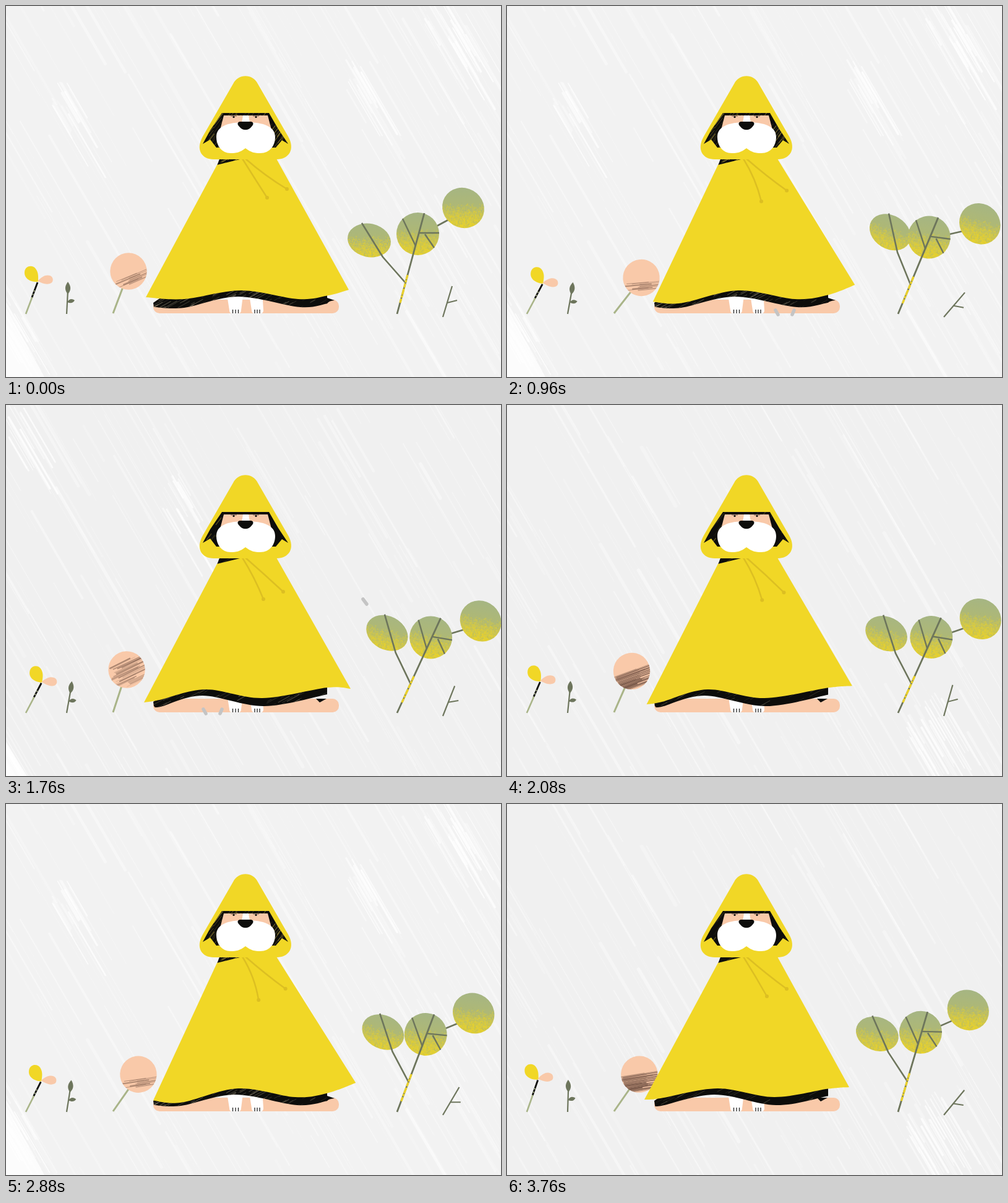
Animation of 800x600 px, one loop 3840 ms. Source, as an HTML page with a canvas:

```html
<!DOCTYPE html>
<html lang="en">
<head>
<meta charset="utf-8">
<title>Dog in the rain</title>
<style>
html, body { margin: 0; width: 800px; height: 600px; overflow: hidden; background: #f1f1f1; }
canvas { display: block; }
</style>
</head>
<body>
<canvas id="stage" width="800" height="600"></canvas>
<script>
const ctx = document.getElementById('stage').getContext('2d');
const STEP = 80, COUNT = 48, RAD = Math.PI / 180;
const YELLOW = '#f1d726', PINK = '#f9c9a9', OLIVE = '#6d755c', MOSS = '#a9b488', BLACK = '#0d0d0b';

// Pose keys share these step numbers; the loop closes at COUNT.
const KEYS = [0, 8, 16, 22, 31, 41, 47];
const pose = {
  tree:   [0, 7.7, 6.7, 9.6, 7.7, 3.5, 1.3],
  leaf:   [0, 15.5, 20.4, 15.7, 12.7, 13.7, 8.1],
  crown:  [0, 14.9, 13.9, 11.7, 6.8, 5.7, 4.9],
  flower: [0, 9, 4.6, 7.1, -1.3, 12.7, -1.3],
  ball:   [0, 19.8, 10.2, -2.5, 12.4, 14.1, 14.1],
  twig:   [0, 34.3, 8.3, 4.9, -3.2, 31.3, 22.8],
  wave:   [380, 367, 374, 322, 342, 398, 340],
  dip:    [474, 480, 480, 477, 484, 480, 476],
  lx:     [226, 233, 236, 223, 232, 240, 222],
  ly:     [471, 479, 477, 481, 486, 473, 478],
  rx:     [554, 560, 563, 557, 561, 567, 553],
  ry:     [459, 452, 452, 459, 448, 456, 458],
  cord1x: [422, 408, 416, 416, 408, 411, 420],
  cord1y: [310, 317, 314, 314, 317, 316, 311],
  cord2x: [454, 447, 457, 448, 449, 454, 452],
  cord2y: [296, 305, 292, 302, 302, 296, 299]
};

// Periodic Hermite interpolation through the pose keys.
function at(list, n) {
  const size = KEYS.length;
  const time = j => KEYS[(j + size) % size] + COUNT * Math.floor(j / size);
  const val = j => list[(j + size) % size];
  const slope = j => (val(j + 1) - val(j - 1)) / (time(j + 1) - time(j - 1));
  let i = size - 1;
  while (KEYS[i] > n) i--;
  const h = time(i + 1) - time(i), u = (n - time(i)) / h, v = 1 - u;
  return val(i) * (1 + 2 * u) * v * v + slope(i) * h * u * v * v +
    val(i + 1) * (3 - 2 * u) * u * u - slope(i + 1) * h * u * u * v;
}

function random(seed) {
  return () => {
    seed = (seed * 1664525 + 1013904223) >>> 0;
    return seed / 4294967296;
  };
}

function layer(w, h, draw) {
  const c = document.createElement('canvas');
  c.width = w;
  c.height = h;
  draw(c.getContext('2d'));
  return c;
}

function line(c, color, width, ...p) {
  c.strokeStyle = color;
  c.lineWidth = width;
  c.beginPath();
  c.moveTo(p[0], p[1]);
  for (let i = 2; i < p.length; i += 2) c.lineTo(p[i], p[i + 1]);
  c.stroke();
}

function shape(color, path) {
  ctx.fillStyle = color;
  ctx.fill(path instanceof Path2D ? path : new Path2D(path));
}

function ellipse(x, y, rx, ry = rx, tilt = 0) {
  const p = new Path2D();
  p.ellipse(x, y, rx, ry, tilt * RAD, 0, 7);
  return p;
}

function turn(x, y, deg, draw) {
  ctx.save();
  ctx.translate(x, y);
  ctx.rotate(deg * RAD);
  ctx.translate(-x, -y);
  draw();
  ctx.restore();
}

function clipped(path, draw) {
  ctx.save();
  ctx.clip(path);
  draw();
  ctx.restore();
}

// Catmull-Rom curve; the path is already at the first point.
function curve(path, pts) {
  for (let i = 0; i < pts.length - 1; i++) {
    const a = pts[Math.max(i - 1, 0)], b = pts[i], c = pts[i + 1], d = pts[Math.min(i + 2, pts.length - 1)];
    path.bezierCurveTo(b[0] + (c[0] - a[0]) / 6, b[1] + (c[1] - a[1]) / 6,
      c[0] - (d[0] - b[0]) / 6, c[1] - (d[1] - b[1]) / 6, c[0], c[1]);
  }
}

// Three rain sheets and three fur textures take turns.
const bright = [
  [[-15, 455], [15, 500], [690, -10], [730, 30], [90, 140], [560, 100]],
  [[-30, 510], [-20, 540], [15, 20], [265, 130]],
  [[690, 480], [660, 520]]
];
const rain = [0, 1, 2].map(m => layer(800, 600, c => {
  const r = random(71 + m * 977);
  const streak = (x, y, len, w, alpha) =>
    line(c, `rgba(255,255,255,${alpha})`, w, x, y, x + len * 0.5, y + len * 0.86);
  c.fillStyle = ['#f2f2f2', '#f0f0f0', '#f0f0f0'][m];
  c.fillRect(0, 0, 800, 600);
  c.lineCap = 'round';
  for (let i = 0; i < 300; i++)
    streak(r() * 1150 - 350, r() * 800 - 200, 60 + r() * 300, 0.6 + r() * r() * 6, 0.12 + r() * 0.28);
  for (const [x, y] of bright[m])
    for (let i = 0; i < 14; i++)
      streak(x + r() * 30 - 15, y + r() * 60 - 20, 30 + r() * 110, 0.6 + r() * 3, 0.3 + r() * 0.5);
  if (m < 2) {
    c.fillStyle = 'rgba(255,255,255,.75)';
    c.fill(new Path2D(m ? 'M0 545L34 600H0Z' : 'M0 488L62 600H0Z'));
  }
}));

const furTex = [0, 1, 2].map(m => layer(320, 340, c => {
  const r = random(5 + m * 31);
  for (let i = 0; i < [1100, 750, 400][m]; i++) {
    const x = r() * 320, y = r() * 340, len = 6 + r() * 16;
    if (m === 1 && y < 90 && x > 140) continue;
    const alpha = (0.15 + r() * 0.4) * [1, 0.8, 0.55][m];
    line(c, y < 120 ? `rgba(205,180,75,${alpha})` : `rgba(175,165,140,${alpha})`,
      0.5 + r() * 0.9, x, y, x + len, y - len * (y < 90 ? 1.3 : 0.55));
  }
}));

const foliage = layer(80, 80, c => {
  const r = random(19), g = c.createLinearGradient(0, 5, 0, 75);
  g.addColorStop(0, '#a5b584');
  g.addColorStop(0.45, '#aeb876');
  g.addColorStop(1, '#e2cf3c');
  c.fillStyle = g;
  c.fillRect(0, 0, 80, 80);
  for (let i = 0; i < 6500; i++) {
    const x = r() * 80, y = r() * 80;
    c.fillStyle = r() < 0.8 ? 'rgba(242,215,34,.6)' : 'rgba(160,178,125,.5)';
    if (r() < (y - 30) / 42) c.fillRect(x, y, 1.1, 1.1);
  }
});

function leaf(x, y, rx, ry, tilt) {
  clipped(ellipse(x, y, rx, ry, tilt), () => ctx.drawImage(foliage, x - 40, y - 40));
}

function fur(path) {
  shape(BLACK, path);
  clipped(path, () => ctx.drawImage(furTex[sheet], 225, 160));
}

function tree(n) {
  const sway = at(pose.tree, n);
  turn(632, 498, sway, () => {
    turn(672, 368, at(pose.crown, n) - sway, () => {
      line(ctx, OLIVE, 2.6, 672, 369, 720, 343);
      leaf(739, 326.5, 34.5, 32, 30);
    });
    turn(645, 447, at(pose.leaf, n) - sway, () => {
      leaf(587, 379, 35.3, 27, 12);
      line(ctx, OLIVE, 2.6, 645, 447, 609, 406, 575, 351);
    });
    leaf(665.5, 368.5, 34.5, 34.5, 0);
    line(ctx, OLIVE, 2.8, 632, 498, 676, 335);
    line(ctx, OLIVE, 2.4, 662, 388, 641, 344);
    line(ctx, OLIVE, 2.4, 667, 367, 700, 367);
    line(ctx, OLIVE, 2.4, 677, 369, 692, 391);
    ctx.setLineDash([7, 1.5, 4, 1, 10, 2]);
    line(ctx, '#e9d02d', 3.4, 637, 480, 649, 435);
    ctx.setLineDash([]);
  });
}

function smallPlants(n) {
  const sway = at(pose.flower, n);
  turn(32, 498, sway, () => {
    line(ctx, MOSS, 2.6, 32, 498, 43, 469);
    line(ctx, BLACK, 2.8, 42, 471, 51, 447);
    ctx.setLineDash([2, 4]);
    line(ctx, MOSS, 2, 41, 473, 46, 460);
    ctx.setLineDash([]);
    shape(YELLOW, 'M52 446C40 447 29 441 30 430C31 420 43 418 48 425C53 432 52 438 52 446Z');
    shape(PINK, 'M51 445C58 437 65 434 71 436C77 438 77 446 73 448C66 452 58 448 51 445Z');
  });
  turn(98, 498, sway, () => {
    line(ctx, OLIVE, 2.2, 98, 498, 100, 460);
    shape(OLIVE, 'M100 446C106 454 105 460 100 466C95 460 94 454 100 446Z');
    shape(OLIVE, 'M99 479C102 473 107 473 111 476C108 481 104 481 99 479Z');
  });
  turn(706, 503, at(pose.twig, n), () => {
    line(ctx, OLIVE, 2.2, 706, 503, 721, 453);
    line(ctx, OLIVE, 2, 713, 480, 729, 476);
  });
}

function lollipop(n) {
  turn(173, 497, at(pose.ball, n), () => {
    line(ctx, MOSS, 3, 173, 497, 190, 452);
    const disc = ellipse(198, 429, 29.7);
    shape(PINK, disc);
    clipped(disc, () => turn(198, 429, -22, () => {
      const r = random(40 + sheet);
      const [top, rows, alpha] = [[8, 11, 0.34], [-13, 22, 0.36], [0, 34, 0.5]][sheet];
      const depth = [13, 40, 28][sheet];
      for (let i = 0; i < rows; i++) {
        const y = 429 + top + depth * i / rows, x = 166 + r() * (sheet === 2 ? 6 : 30);
        line(ctx, `rgba(105,75,62,${alpha * (0.5 + r())})`, 0.6 + r() * 1.6, x, y, x + 30 + r() * 40, y - r() * 2);
      }
    }));
  });
}

function body(n) {
  const p = at(pose.wave, n), lx = at(pose.lx, n), ly = at(pose.ly, n);
  const rx = at(pose.rx, n), ry = at(pose.ry, n);
  const drift = p - 322;
  const hemEnd = 457 + drift * 0.2, furEnd = 468 + drift * 0.23;

  const seat = new Path2D();
  seat.roundRect(238, 475, 300, 22, 10);
  shape(PINK, seat);
  shape('#fff', 'M356 460H384L380 492Q380 497 376 497H365Q361 497 361 492Z');
  shape('#fff', 'M392 460H414L416 492Q416 497 412 497H401Q397 497 397 492Z');
  for (const x of [366.5, 371, 375.5, 402, 406, 410]) line(ctx, '#222', 1.3, x, 491, x, 497);

  const under = new Path2D('M519 450H300L260 465L238 480L239 487');
  curve(under, [[239, 487], [Math.max(p - 92, 250), 488], [p - 5, 470], [p + 95, 487], [519, furEnd]]);
  if (furEnd > 476) under.quadraticCurveTo(521, 477, 531, 476);
  under.lineTo(519, Math.min(furEnd, 472));
  under.closePath();
  fur(under);
  shape(BLACK, 'M501 475L507 481L518 475Z');

  fur(new Path2D('M346 245H386V248L341 258Z'));
  const cape = new Path2D(`M341 257L382 247H437L${rx} ${ry}`);
  curve(cape, [[rx, ry], [519, hemEnd], [p + 92, 474], [p, 460], [Math.max(p - 92, lx + 25), at(pose.dip, n)], [lx, ly]]);
  cape.closePath();
  shape(YELLOW, cape);

  const cord = (x, cx, cy, ex, ey) => {
    ctx.strokeStyle = '#dcbf22';
    ctx.lineWidth = 2.4;
    ctx.stroke(new Path2D(`M${x} 247Q${cx} ${cy} ${ex} ${ey}`));
    shape('#dcbf22', ellipse(ex, ey, 3));
  };
  cord(382, 402, 279, at(pose.cord1x, n), at(pose.cord1y, n));
  cord(387, 419, 275, at(pose.cord2x, n), at(pose.cord2y, n));
}

function head() {
  shape(YELLOW, 'M367 126C375 109 399 109 407 126L456 211C468 232 457 248 437 248H336C316 248 306 232 318 211Z');
  fur(new Path2D('M349 173H425L440 199L456 223L446 217L436 229H340L330 216L318 223L330 201Z'));
  shape(PINK, 'M352 177H423L429 200H346Z');
  shape('#fff', 'M383 177H392L395 195H380Z');
  shape('#fff', 'M387 230C378 237 372 238 363 238C349 238 340 226 340 212C340 195 357 188 387 188C417 188 435 195 435 212C435 226 426 238 411 238C402 238 396 237 387 230Z');
  shape(BLACK, 'M378 187H396C401 188 400 192 397 195C392 202 382 202 377 195C374 192 373 188 378 187Z');
  for (const x of [368, 404]) {
    line(ctx, '#6d5548', 0.9, x - 5, 178, x + 5, 178);
    shape(BLACK, ellipse(x, 179.5, 1.6));
  }
}

// Each drop: step number and place on its way down.
const drops = [[8, 214, 140], [8, 629, 399], [16, 659, 318], [22, 580, 318], [22, 334, 496], [31, 436, 318], [41, 711, 452]];

function fallingDrops(n) {
  ctx.lineCap = 'round';
  for (const [when, x0, y0] of drops) {
    const fall = 89 * (n - when), x = x0 + fall * 0.66, y = y0 + fall;
    if (y < 130 || y > 535) continue;
    if (y < 485) line(ctx, '#c4c4c4', 5.5, x - 3, y - 4, x + 3, y + 4);
    else {
      line(ctx, '#c4c4c4', 5.5, x - 15, 492, x - 11, 499);
      line(ctx, '#c4c4c4', 5.5, x + 15, 492, x + 12, 499);
    }
  }
  ctx.lineCap = 'butt';
}

let sheet = 0, last = -1;

function draw() {
  const n = Math.floor(performance.now() / STEP) % COUNT;
  if (n !== last) {
    last = n;
    sheet = n % 3;
    ctx.drawImage(rain[sheet], 0, 0);
    ctx.lineJoin = 'round';
    smallPlants(n);
    tree(n);
    lollipop(n);
    body(n);
    head();
    fallingDrops(n);
  }
  requestAnimationFrame(draw);
}
draw();
</script>
</body>
</html>
```
